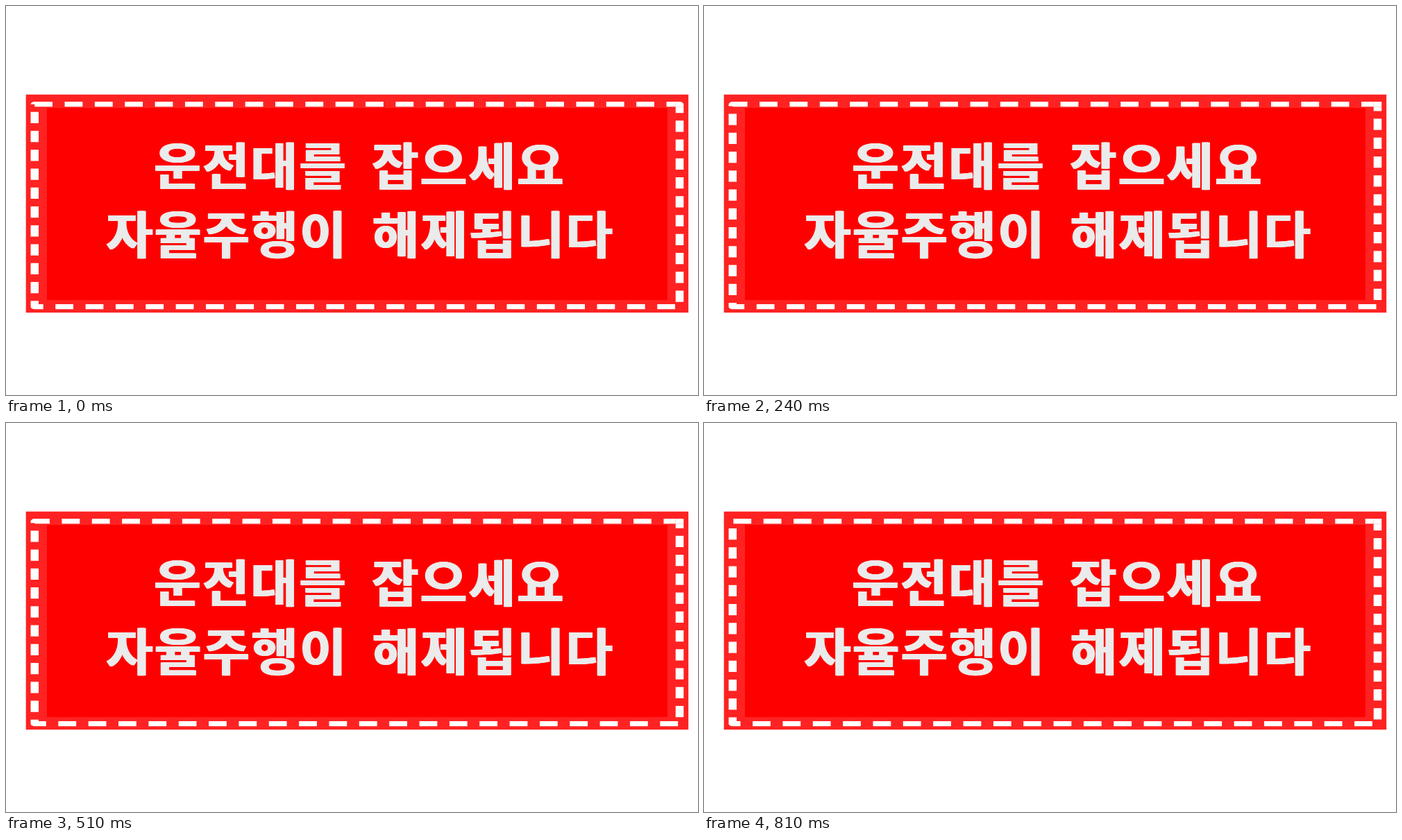
Animation, 997 px wide and 561 px high, one loop 840 ms. Source, as an HTML page with a canvas:

```html
<!DOCTYPE html>
<html lang="ko">
<head>
<meta charset="utf-8">
<title>운전대 경고</title>
<style>
  html, body { margin: 0; width: 100%; height: 100%; overflow: hidden; background: #fff; }
  canvas { display: block; }
</style>
</head>
<body>
<canvas id="stage" width="997" height="561"></canvas>
<script>
const ctx = document.getElementById('stage').getContext('2d');

const STEP_MS = 30, STEPS = 28;

// The border lives in a stretched space where one dash period is one unit.
const BORDER = { x: 41.3, y: 141.7, scaleX: 43.35, scaleY: 27.25, w: 21.435, h: 10.716, line: 0.266 };
const DASH = 0.595, START_OFFSET = 0.135, SPEED = 0.1121;

const LINES = [
  { text: '운전대를 잡으세요', x: 247, y: 257.5 },
  { text: '자율주행이 해제됩니다', x: 178, y: 356.5 }
];
const CELL = 69.7, SPACE = 35, STEM_SPREAD = 1.3;

const isOn = phase => ((phase % 1) + 1) % 1 < DASH;

function fillBox(color, left, top, right, bottom) {
  ctx.fillStyle = color;
  ctx.fillRect(left, top, right - left, bottom - top);
}

function strokePath(points, join) {
  ctx.lineJoin = join;
  ctx.beginPath();
  points.forEach(([x, y]) => ctx.lineTo(x, y));
  ctx.stroke();
}

function drawBorder(step) {
  const { x, y, scaleX, scaleY, w, h, line } = BORDER;
  const half = line / 2;
  const startPhase = START_OFFSET - SPEED * step + half;
  const endPhase = startPhase + 2 * (w + h - half);

  ctx.save();
  ctx.translate(x, y);
  ctx.scale(scaleX, scaleY);
  ctx.strokeStyle = '#fff';
  ctx.lineWidth = line;

  // The dashed path runs clockwise between the two sides of the top right corner.
  ctx.setLineDash([DASH, 1 - DASH]);
  ctx.lineDashOffset = startPhase;
  strokePath([[w, half], [w, h], [0, h], [0, 0], [w - half, 0]], 'round');

  if (isOn(startPhase) || isOn(endPhase)) {
    ctx.setLineDash([]);
    strokePath([[w - half, 0], [w, 0], [w, half]], step === 0 ? 'round' : 'miter');
  }
  ctx.restore();
}

function drawLine({ text, x, y }) {
  for (const char of text) {
    if (char === ' ') {
      x += SPACE;
      continue;
    }
    // Overprinting sideways makes the stems heavier than the bars.
    for (const shift of [-STEM_SPREAD, 0, STEM_SPREAD]) ctx.fillText(char, x + shift, y);
    x += CELL;
  }
}

function drawMessage() {
  ctx.font = '900 73px "Noto Sans CJK KR", "Noto Sans CJK", "Noto Sans CJK JP", sans-serif';
  ctx.textAlign = 'center';
  ctx.textBaseline = 'alphabetic';
  ctx.fillStyle = '#ebebeb';
  LINES.forEach(drawLine);
}

function draw() {
  const step = Math.floor(performance.now() / STEP_MS) % STEPS;
  fillBox('#fff', 0, 0, 997, 561);
  fillBox('#ff2222', 28.7, 127.7, 983.2, 442.2);
  fillBox('#ff0000', 59, 147, 953, 424);
  drawBorder(step);
  drawMessage();
  requestAnimationFrame(draw);
}

draw();
</script>
</body>
</html>
```
